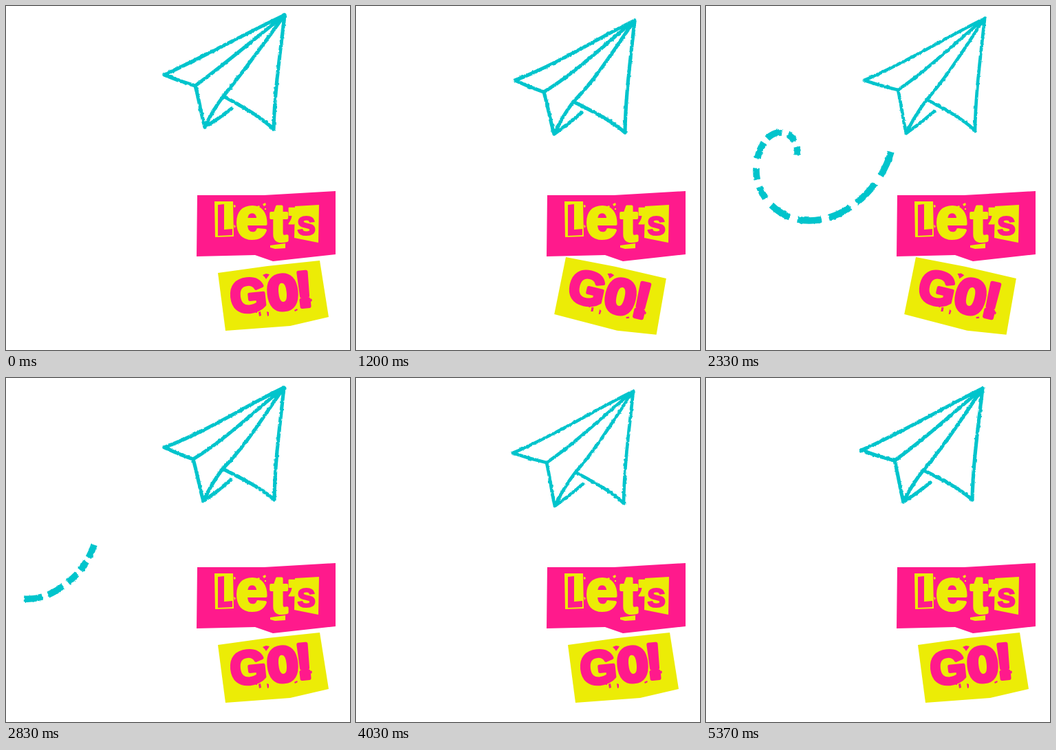
These frames come from a looping animation (500 by 500 pixels, 5410 ms). An HTML page:

```html
<!DOCTYPE html>
<html lang="en">
<head>
<meta charset="utf-8">
<title>Let's go!</title>
<style>
  html, body { margin: 0; width: 100%; height: 100%; overflow: hidden; background: #fff; }
  svg { display: block; width: 100vw; height: 100vh; }
  text { font: bold 70px "Liberation Sans", Arial, sans-serif; text-anchor: middle; stroke-linejoin: round; }
  .mono { font-family: "Liberation Mono", "Courier New", monospace; }
  .pink { fill: #ff1a8c; stroke: #ff1a8c; }
  .yellow { fill: #ecec06; stroke: #ecec06; }
  .flat { stroke: none; }
  .ink { fill: none; stroke: #00c4cc; }
</style>
</head>
<body>
<svg viewBox="0 0 500 500" role="img" aria-label="Let's go!">
  <defs>
    <filter id="rough" filterUnits="userSpaceOnUse" x="0" y="0" width="500" height="500" color-interpolation-filters="sRGB">
      <feTurbulence type="fractalNoise" baseFrequency=".22" numOctaves="2" seed="4"/>
      <feDisplacementMap in="SourceGraphic" scale="3" xChannelSelector="R" yChannelSelector="G"/>
    </filter>
  </defs>

  <g filter="url(#rough)">
    <path id="trail" class="ink" stroke-width="9.5" pathLength="563"/>
    <path id="plane" class="ink" stroke-width="5" stroke-linecap="round" stroke-linejoin="round"/>
  </g>

  <g id="lets">
    <path class="pink flat" d="M278 275L375 275L479 269L479 361L388 371L362 362L277 364Z"/>
    <path class="yellow flat" d="M303 284L330 284L331 335L304 336Z"/>
    <path class="pink flat" d="M308 289L317 288L317 325L329 324V333L308 334Z"/>
    <text class="yellow" x="357" y="336.5" stroke-width="4" style="font-size:84px">e</text>
    <text class="yellow" x="397" y="341" stroke-width="4" style="font-size:76px">t</text>
    <text class="yellow" x="417" y="349" stroke-width="2" style="font-size:80px">’</text>
    <path class="yellow flat" d="M420 291L455 289L454 344L419 337Z"/>
    <text class="pink mono" x="436.5" y="333" stroke-width="2" style="font-size:50px">s</text>
    <path class="yellow flat" d="M384 348L406 345L406 352L391 353L384 351Z
      M373 288l4 -2l1 3l-3 2Z M365 291l3 -1l1 2l-3 1Z M331 289l3 1l-1 3l-2 -1Z M376 294h2v2h-2Z M331 318l3 2l-2 3Z"/>
  </g>

  <g id="go">
    <path class="yellow flat" d="M308 388L380 378L456 370L469 452L413 465L319 472Z"/>
    <g class="pink" transform="rotate(-6 326 449)">
      <text x="355" y="447" stroke-width="5" style="font-size:68px">G</text>
      <text class="mono" x="405" y="449" stroke-width="6" style="font-size:74px">O</text>
      <text x="436.5" y="448" stroke-width="6" style="font-size:72px">!</text>
    </g>
    <path class="pink flat" d="M373 391l5 -2l5 1l-2 3l-3 4l-2 -3Z M367 445l3 -1l1 6l-3 1Z M379 444l3 1v5l-2 1Z
      M363 443h2v3h-2Z M443 425l2 2l-1 3l-2 -2Z M419 442l4 -2l1 2l-4 2Z"/>
  </g>
</svg>
<script>
const LOOP = 5410;
const BOB = LOOP / 2, TRAIL = LOOP / 4, FLIP = LOOP / 8, BOIL = LOOP / 40;
const el = id => document.getElementById(id);
const trail = el('trail'), plane = el('plane'), go = el('go');

// Nose of the plane: time, x, y
const NOSE = [
  [0, 405, 13], [595, 396, 21], [1200, 405, 21], [1325, 403, 19],
  [2065, 404, 22], [2330, 405, 18], [2665, 402, 15], [BOB, 405, 13]
];

// Redrawn outlines relative to the nose: wing, crease, keel, flap, fold, keel end
const SHAPES = [
  [[-175, 87], [-130, 103], [-116, 163], [-16, 166], [-89, 118], [-77, 136]],
  [[-174, 87], [-132, 104], [-117, 165], [-14, 163], [-89, 118], [-77, 134]],
  [[-175, 90], [-126, 104], [-114, 167], [-14, 163], [-84, 118], [-73, 135]],
  [[-176, 90], [-128, 105], [-115, 165], [-15, 162], [-86, 119], [-76, 137]]
];
const BENDS = [2, 7, 5, 4];
const ORDER = '0213203213021301320312012130120132012023';

// Dash and gap lengths along the trail, from the tail to the plane
const DASHES = [27, 9, 25, 9, 18, 7, 15, 7, 20, 12, 24, 9, 14, 9, 24, 8, 25, 14,
  17, 11, 19, 13, 32, 12, 35, 11, 35, 11, 39, 14, 38];
const LENGTH = DASHES.reduce((a, b) => a + b);

const clamp = v => Math.min(1, Math.max(0, v));

function noseAt(t) {
  const i = NOSE.findIndex(k => k[0] > t);
  const a = NOSE[i - 1], b = NOSE[i];
  const u = (t - a[0]) / (b[0] - a[0]), e = u * u * (3 - 2 * u);
  return [a[1] + (b[1] - a[1]) * e, a[2] + (b[2] - a[2]) * e];
}

// Hand-drawn line that sags by n1 and n2 at its two control points
function line([x1, y1], [x2, y2], n1 = 0, n2 = n1) {
  const dx = x2 - x1, dy = y2 - y1, d = Math.hypot(dx, dy);
  const at = (u, n) => `${x1 + dx * u - dy / d * n} ${y1 + dy * u + dx / d * n}`;
  return `M${x1} ${y1}C${at(.33, n1)} ${at(.67, n2)} ${x2} ${y2}`;
}

function drawPlane(t, pose) {
  const nose = noseAt(t % BOB);
  const [wing, crease, keel, flap, fold, end] =
    SHAPES[pose].map(([x, y]) => [nose[0] + x, nose[1] + y]);
  const bend = BENDS[pose];
  plane.setAttribute('d',
    line(wing, nose, bend, -1) + line(wing, crease, 1) + line(crease, nose, bend, 0) +
    line(crease, keel, -1, 1) + line(keel, fold, -2) + line(fold, nose, bend, 1) +
    line(fold, flap, -2, -5) + line(flap, nose, -4, -1) + line(keel, end, 1));
  plane.setAttribute('stroke-width', pose === 2 ? 4.7 : 5.2);
}

function drawTrail(t, pose) {
  const p = t % TRAIL;
  const head = LENGTH * (1 - (1 - clamp((p - 50) / 450)) ** 1.6);
  const tail = LENGTH * clamp((p - 800) / 390) ** 1.6;
  const out = [];
  let pos = 0, drawn = 0;
  DASHES.forEach((len, i) => {
    const from = Math.max(pos, tail), to = Math.min(pos + len, head);
    if (i % 2 === 0 && to > from) {
      out.push(from - drawn, to - from);
      drawn = to;
    }
    pos += len;
  });
  trail.style.display = out.length ? '' : 'none';
  trail.setAttribute('stroke-dasharray', [0, ...out, 2 * LENGTH].join(' '));
  trail.setAttribute('d', `M${pose === 2 ? '30 324' : '26 321'}C55 323 80 308 100 288` +
    'C120 268 133 240 133 213C133 192 118 183 105 184C85 187 73 212 73 240' +
    'C73 275 105 312 150 312C205 312 255 262 269 212');
}

function draw(t) {
  const pose = +ORDER[Math.floor(t / BOIL) % ORDER.length];
  drawPlane(t, pose);
  drawTrail(t, pose);
  const turn = (t / FLIP + .17) % 1;
  go.setAttribute('transform', turn < .5 ? '' : 'translate(305 365) rotate(18.9) translate(-308 -388)');
}

const start = performance.now();
function tick() {
  draw((performance.now() - start) % LOOP);
  requestAnimationFrame(tick);
}
tick();
</script>
</body>
</html>
```
